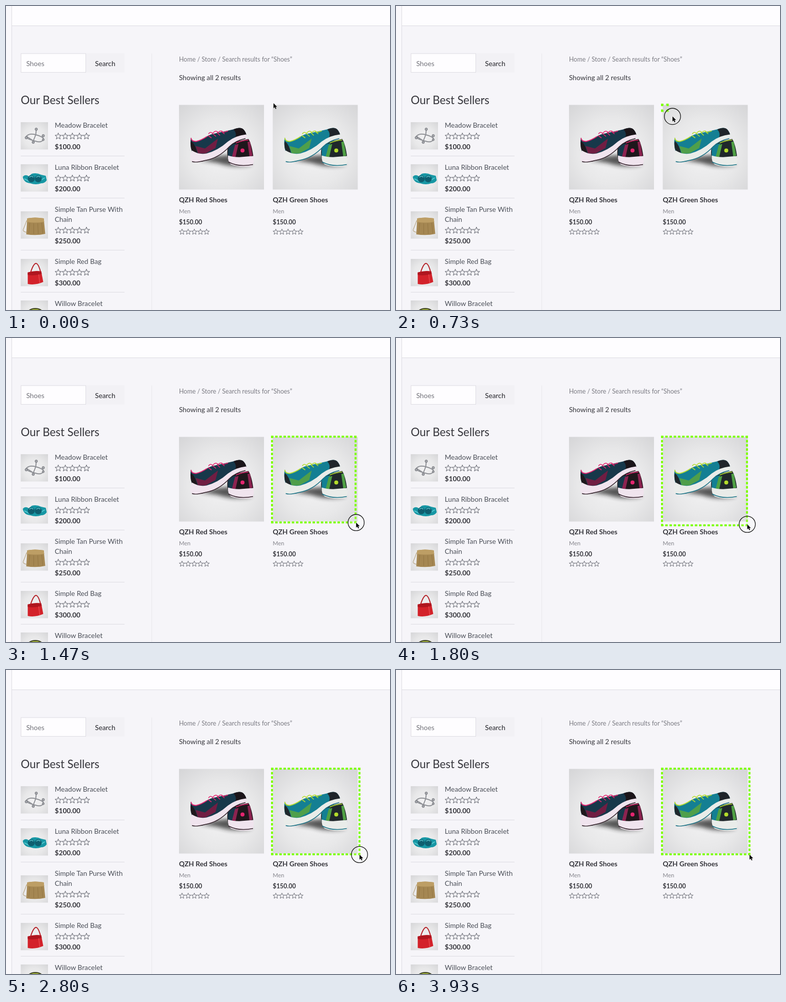
An HTML page that plays this animation: 768x607 px, repeating every 3990 ms.

```html
<!DOCTYPE html>
<html lang="en">
<head>
<meta charset="utf-8">
<title>Shop search</title>
<style>
html, body { margin: 0; width: 100%; height: 100%; overflow: hidden; background: #f6f5f9; }
svg { display: block; }
text { font-family: Lato, "Open Sans", sans-serif; font-size: 13.8px; fill: #4b4f58; }
.dark { fill: #36363c; }
.bold { font-weight: 700; fill: #36363c; }
.crumb { font-size: 12.5px; fill: #7b7b83; }
.small { font-size: 11.5px; fill: #85858c; }
.price { font-size: 12.4px; }
.head { font-size: 22.4px; fill: #36363c; }
.line { stroke: #dddce2; fill: none; }
.stars { fill: none; stroke: #5a5d66; stroke-linejoin: round; }
.red { --upper: #17384a; --toe: #1b1519; --panel: #701e43; --trim: #e3256f; --sole: #f0e4ee; --edge: #33222b; --heel: #1f171c; --side: #8c2350; }
.green { --upper: #147f93; --toe: #20252a; --panel: #4f9f4b; --trim: #b4dc2b; --sole: #e9ece9; --edge: #176f83; --heel: #20282b; --side: #4fa044; }
</style>
</head>
<body>
<svg width="768" height="607" viewBox="0 0 768 607">
  <defs>
    <radialGradient id="studio" cx=".5" cy=".55" r=".72">
      <stop offset="0" stop-color="#f3f3f4"/>
      <stop offset=".55" stop-color="#e8e8e9"/>
      <stop offset="1" stop-color="#d6d6d8"/>
    </radialGradient>
    <filter id="soft" x="-30%" y="-80%" width="160%" height="260%"><feGaussianBlur stdDeviation="4"/></filter>
    <path id="star" d="M0-6.6 1.7-2.1 6.5-1.9 2.7 1.1 4 5.7 0 3 -4 5.7 -2.7 1.1 -6.5-1.9 -1.7-2.1Z"/>
    <g id="row">
      <use href="#star" x="7"/><use href="#star" x="21.1"/><use href="#star" x="35.2"/><use href="#star" x="49.3"/><use href="#star" x="63.4"/>
    </g>
    <g id="pair">
      <rect width="170" height="169" fill="url(#studio)"/>
      <path d="M42 110Q78 100 104 100L146 119Q110 127 78 116Z" fill="#222" opacity=".75" filter="url(#soft)"/>
      <!-- shoe seen from behind -->
      <path d="M98 84Q106 71 120 72L139 68Q146 80 149 106L98 107Q95 94 98 84Z" fill="var(--heel)"/>
      <path d="M98 86Q106 77 115 77L107 105 98 104Z" fill="var(--upper)"/>
      <path d="M112 80 119 78 113 104 106 103ZM137 74 142 73 147 101 141 103Z" fill="var(--side)"/>
      <path d="M114 76Q126 71 139 70" fill="none" stroke="var(--trim)" stroke-width="1.5"/>
      <circle cx="127" cy="91" r="4" fill="var(--trim)"/>
      <path d="M98 101Q112 105 124 104T149 102Q151 117 146 122 124 126 104 119 97 113 98 101Z" fill="var(--sole)"/>
      <path d="M99 114Q120 125 148 119" fill="none" stroke="var(--edge)" stroke-width="1.5"/>
      <!-- shoe seen from the side -->
      <path d="M24 65Q25 73 34 73 44 71 56 63 64 58 72 57 90 53 108 49 123 43 129 49 136 57 134 63 112 67 100 78 78 98 52 102 32 103 26 94 21 80 24 65Z" fill="var(--upper)"/>
      <path d="M109 49Q123 43 129 49 136 57 134 63 120 64 110 70 118 58 109 49Z" fill="var(--toe)"/>
      <path d="M24 72Q33 79 37 98 29 97 26 92 22 82 24 72Z" fill="var(--heel)"/>
      <path d="M33 82 52 87 78 67 73 86 53 97 38 97Z" fill="var(--panel)"/>
      <path d="M24 66Q25 73 34 73 44 71 56 63" fill="none" stroke="var(--trim)" stroke-width="1.8"/>
      <path d="M58 61l7 5M67 57l7 6M76 55l6 6M85 53l6 5M59 58q4-6 8-1q7-8 11-2q7-6 10 0l10-3" fill="none" stroke="var(--trim)" stroke-width="1.6"/>
      <path d="M26 91Q40 100 55 97 78 91 98 73 114 61 134 59 138 63 133 67 112 72 101 83 80 106 52 111 34 116 25 113 19 104 26 91Z" fill="var(--sole)"/>
      <path d="M26 113Q34 116 52 111 80 106 101 83 112 72 133 67" fill="none" stroke="var(--edge)" stroke-width="1.5"/>
    </g>
    <g id="silver" fill="none" stroke="#8f9196" stroke-width="2">
      <path d="M10 30Q15 21 30 25T46 34Q41 42 30 38 16 35 10 30ZM31 15 30 25 24 40M11 28l14 9"/>
      <g fill="#a6a8ad" stroke="#717379" stroke-width="1"><circle cx="31" cy="14" r="2.5"/><circle cx="11" cy="31" r="2.5"/><circle cx="45" cy="27" r="2.5"/><circle cx="25" cy="40" r="2.5"/><circle cx="45" cy="35" r="2"/></g>
    </g>
    <g id="teal">
      <path d="M4 25Q9 19 16 24L22 19Q31 16 41 21L50 23 52 32Q48 38 41 38 30 42 19 38 6 37 4 25Z" fill="#1797a4"/>
      <path d="M7 29l10 5M37 34l11-7" stroke="#55c7ce" stroke-width="2"/>
      <circle cx="21" cy="29" r="7" fill="#0e5f70"/><circle cx="35" cy="29" r="7" fill="#0e5f70"/>
      <path d="M17 26q5-4 8 0M31 26q5-4 8 0" fill="none" stroke="#56c2ca" stroke-width="1.5"/>
    </g>
    <g id="purse">
      <path d="M12 18Q7 32 5 36T12 42" fill="none" stroke="#b9a889" stroke-width="1.2"/>
      <path d="M13 14Q28 11 46 14L49 45Q32 49 11 46Z" fill="#a58752"/>
      <path d="M13 14Q28 11 46 14L47 21Q29 24 12 21Z" fill="#bd9e65"/>
      <path d="M18 23l-2 21M26 24v21M34 24l1 21M42 23l2 21" stroke="#8f723f" stroke-width=".8"/>
    </g>
    <g id="bag">
      <path d="M19 29Q25 10 30 9T40 27" fill="none" stroke="#b52027" stroke-width="2"/>
      <path d="M14 27Q28 23 41 25L45 46Q29 53 14 50Z" fill="#d3222a"/>
      <path d="M14 27Q28 23 41 25L42 30Q28 34 14 32ZM17 32l2 16" fill="#b0161f"/>
      <path d="M36 31l2 17" stroke="#ed5054" stroke-width="1.2"/>
    </g>
    <g id="beads"><path d="M10 29Q17 17 29 17T46 27" fill="none" stroke="#3b4020" stroke-width="4"/><path d="M14 23Q29 13 42 22" fill="none" stroke="#b4c542" stroke-width="1.5"/></g>
  </defs>

  <rect width="768" height="607" fill="#f6f5f9"/>
  <rect width="11" height="607" fill="#f9f8fb"/>
  <rect x="12" width="756" height="39" fill="#fefdff"/>
  <path class="line" d="M11.5 0V607M12 39.5H768"/>
  <path d="M291.5 95V607" stroke="#e8e7ec"/>
  <rect class="line" x="30" y="95" width="129.5" height="37.5" style="fill:#fefdff"/>
  <rect x="160" y="94.5" width="77" height="38.5" fill="#f2f1f5"/>
  <text x="40.5" y="119.5" style="fill:#72727a">Shoes</text>
  <text x="178" y="119.5" style="fill:#222228">Search</text>
  <text class="head" x="29.5" y="195.5">Our Best Sellers</text>
  <text class="crumb" x="346" y="111">Home / Store / Search results for “Shoes”</text>
  <text class="dark" x="346" y="148">Showing all 2 results</text>
  <g id="list"></g>
  <g id="products"></g>
  <path id="box" fill="none" stroke="#80ff0c" stroke-width="4"/>
  <g id="cursor">
    <circle id="ring" r="16.2" fill="#fff" fill-opacity=".15" stroke="#151515" stroke-width="1.3"/>
    <path d="M0 0V10.2L2.3 8.1 4 11.8 5.8 11 4.2 7.4H7.3Z" fill="#080808" stroke="#fff" stroke-width=".7" paint-order="stroke"/>
  </g>
</svg>
<script>
const $ = id => document.getElementById(id);
const label = (x, y, str, cls = "") => `<text x="${x}" y="${y}" class="${cls}">${str}</text>`;
const stars = (x, y, k = 1) =>
  `<use class="stars" href="#row" transform="translate(${x} ${y}) scale(${k})"/>`;

// thumbnail, its top, first baseline, price, title lines
const items = [
  ["silver", 232, 243, 100, "Meadow Bracelet"],
  ["teal", 316, 327, 200, "Luna Ribbon Bracelet"],
  ["purse", 410, 411, 250, "Simple Tan Purse With", "Chain"],
  ["bag", 505, 515, 300, "Simple Red Bag"],
  ["beads", 588, 599, 150, "Willow Bracelet"]
];
$("list").innerHTML = items.map(([art, top, y, price, ...lines]) => {
  const last = y + 20 * (lines.length - 1);
  return `<g transform="translate(29.5 ${top})"><rect width="54.5" height="54.5" fill="url(#studio)"/><use href="#${art}"/></g>`
    + lines.map((str, i) => label(97.5, y + 20 * i, str)).join("")
    + stars(97.5, last + 17) + label(97.5, last + 43, `$${price}.00`, "bold")
    + `<path class="line" d="M29.5 ${last + 56.5}H237"/>`;
}).join("");

$("products").innerHTML = [[346, "red", "QZH Red Shoes"], [533.5, "green", "QZH Green Shoes"]]
  .map(([x, look, name]) =>
    `<use href="#pair" class="${look}" x="${x}" y="197.5"/>`
    + label(x, 391.5, name, "bold") + label(x, 413.5, "Men", "small")
    + label(x, 435.5, "$150.00", "bold price") + stars(x, 451, .87)).join("");

const LOOP = 3990, STEP = 66.5;
const RING_ON = 400, RING_OFF = 3290, BOX_ON = 660;
// time, x, y
const pointer = [[0, 535, 194], [600, 535, 194], [730, 552.5, 220], [1070, 656, 318], [1200, 692, 353],
  [1330, 699, 366], [1600, 701.5, 371], [1800, 702.5, 372], [2330, 706, 368.5], [2700, 707, 368.5]];
const corner = [[660, 537, 202], [730, 543, 209], [1200, 688.5, 350], [1330, 698, 366],
  [1800, 702, 374], [2330, 706, 369], [2700, 707, 368]];

function at(keys, t) {
  const i = keys.findIndex(k => k[0] > t);
  if (i < 0) return keys[keys.length - 1].slice(1);
  if (i === 0) return keys[0].slice(1);
  const a = keys[i - 1], b = keys[i], u = (t - a[0]) / (b[0] - a[0]);
  return [a[1] + (b[1] - a[1]) * u, a[2] + (b[2] - a[2]) * u];
}

// dashes fitted so that every side starts and ends with a full one
function dashes(from, to, draw) {
  const dash = 5, room = to - from + 4 - dash, n = Math.max(1, Math.round(room / 8.4));
  let d = "";
  for (let i = 0; i <= n; i++) d += draw(from - 2 + room * i / n, dash);
  return d;
}

function render(now) {
  const t = Math.floor((now % LOOP + 3) / STEP) % 60 * STEP;
  const [x, y] = at(pointer, t), [right, bottom] = at(corner, t);
  $("cursor").setAttribute("transform", `translate(${x} ${y})`);
  $("ring").style.display = t >= RING_ON && t < RING_OFF ? "" : "none";
  $("box").setAttribute("d", t < BOX_ON ? "" :
    dashes(532, right, (p, w) => `M${p} 197h${w}M${p} ${bottom}h${w}`)
    + dashes(197, bottom, (p, w) => `M532 ${p}v${w}M${right} ${p}v${w}`));
}

const start = performance.now();
function tick() {
  render(performance.now() - start);
  requestAnimationFrame(tick);
}
tick();
</script>
</body>
</html>
```
